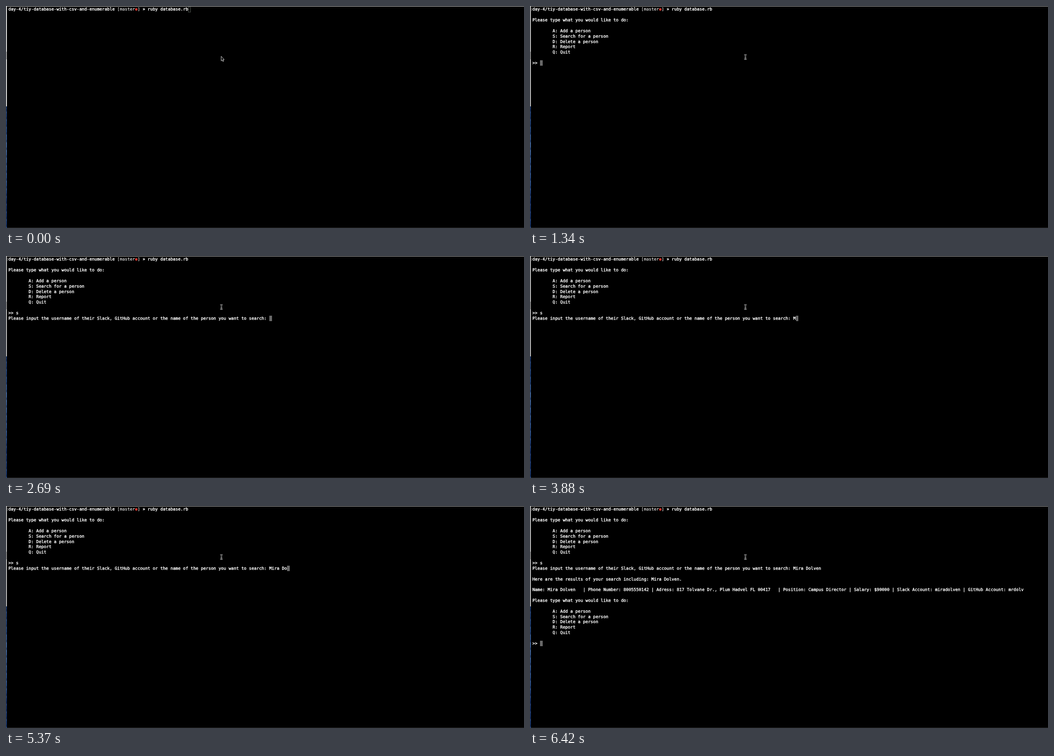
Write an HTML page that moves like this. It is 1141 px wide and 491 px high and loops after 8000 ms.

```html
<!DOCTYPE html>
<html lang="en">
<head>
<meta charset="utf-8">
<title>Terminal search</title>
<style>
html, body { margin: 0; width: 100%; height: 100%; overflow: hidden; background: #000; }
#stage { position: relative; width: 1141px; height: 491px; overflow: hidden; background: #000; --edge: #dadada; }
#stage.focused { --edge: #b9b9b9; }
#stage > * { position: absolute; margin: 0; }
#top { left: 0; top: 0; width: 1141px; height: 1px; background: var(--edge); }
#side { left: 0; top: 0; width: 2px; height: 222px; background: linear-gradient(transparent 101px, #0004 101px 118px, transparent 118px), var(--edge); }
#desktop {
  left: 0; top: 222px; width: 2px; height: 269px;
  background: repeating-linear-gradient(#0000 0 5px, #0a1c4466 7px 10px, #7fa0cc33 13px, #0000 17px),
    linear-gradient(#1b3768, #23477f 20%, #41669c 32%, #2c508a 55%, #2a4f8c 66%, #142f66 78%, #1a3a72);
}
#bottom { left: 2px; top: 490px; width: 1139px; height: 1px; background: #262626; }
#screen {
  left: 5.2px; top: 2.4px; color: #fff; white-space: pre;
  font: 9.27px/11.86px "DejaVu Sans Mono", monospace;
  text-rendering: geometricPrecision; font-variant-ligatures: none;
  -webkit-text-stroke: .4px;
}
#branch { color: #eee; -webkit-text-stroke: .15px; }
#branch i { color: #d8352c; font-style: normal; -webkit-text-stroke: 0; }
#mark { left: 3px; top: 4px; width: 1px; height: 7px; border: solid #777; border-width: 1px 0 1px 1px; box-sizing: border-box; }
#cursor { width: 5.6px; height: 11.9px; box-sizing: border-box; border: 1px solid #4d524d; }
.focused #cursor { background: #686868; border-color: #686868; }
svg { left: 0; top: 0; }
</style>
</head>
<body>
<div id="stage">
  <div id="top"></div><div id="side"></div><div id="desktop"></div><div id="bottom"></div>
  <div id="mark"></div>
  <div id="cursor"></div>
  <pre id="screen">day-4/tiy-database-with-csv-and-enumerable <span id="branch">[master<i>●</i>]</span> » ruby database.rb<span id="output"></span></pre>
  <svg width="1141" height="491" fill="none">
    <path id="arrow" fill="#000" stroke="#eee" stroke-width=".9" d="M474 111.2V121.4L476.3 119.3L477.8 122.7L479.4 122L478 118.7H480.7Z"/>
    <g id="beam">
      <path stroke="#bbb" stroke-width="2.4" d="M471.8 107.6Q474 107.6 474.5 109Q475 107.6 477.2 107.6M474.5 108.5V117M471.8 117.9Q474 117.9 474.5 116.5Q475 117.9 477.2 117.9M473 114.5H476"/>
      <path stroke="#000" stroke-width=".9" d="M472 107.6Q474 107.6 474.5 109V116.5Q474 117.9 472 117.9M477 107.6Q475 107.6 474.5 109M474.5 116.5Q475 117.9 477 117.9"/>
    </g>
  </svg>
</div>
<script>
const $ = id => document.getElementById(id);
const LOOP = 8000, CELL = 5.581, ROW = 11.86, LEFT = 5.2, TOP = 1.8, PROMPT_COLS = 71;
const person = 'Mira Dolven';
const menu = `
Please type what you would like to do:

        A: Add a person
        S: Search for a person
        D: Delete a person
        R: Report
        Q: Quit

>> `;
const question = '\n' + menu + 's\nPlease input the username of their Slack, GitHub account or the name of the person you want to search: ';
const results = `

Here are the results of your search including: ${person}.

Name: ${person}   | Phone Number: 8005550142 | Adress: 817 Tolvane Dr., Plum Hadvel FL 00417   | Position: Campus Director | Salary: $90000 | Slack Account: miradolven | GitHub Account: mrdolv
`;

// [time, letters of the name typed so far]
const keys = [[3880, 1], [4020, 2], [4170, 4], [4620, 5], [5220, 6], [5370, 7], [5670, 8], [5970, 10], [6120, 11]];
const steps = [
  [0, ''], [1130, '\n'], [1340, '\n' + menu], [2540, '\n' + menu + 's'], [2690, question],
  ...keys.map(([time, count]) => [time, question + person.slice(0, count)]),
  [6420, question + person + results + menu]
];

let shown;
function draw(now) {
  const t = now % LOOP;
  const text = steps.findLast(([time]) => time <= t)[1];
  if (text !== shown) {
    $('output').textContent = shown = text;
    const lines = text.split('\n'), row = lines.length - 1;
    const col = lines[row].length + (row ? 0 : PROMPT_COLS);
    $('cursor').style.left = LEFT + col * CELL + 'px';
    $('cursor').style.top = TOP + row * ROW + 'px';
  }
  $('stage').classList.toggle('focused', t >= 530);
  $('mark').style.visibility = t >= 1130 ? 'visible' : 'hidden';
  $('arrow').style.visibility = t < 300 ? 'visible' : 'hidden';
  $('beam').style.visibility = t < 300 ? 'hidden' : 'visible';
  requestAnimationFrame(draw);
}
draw(performance.now());
</script>
</body>
</html>
```
